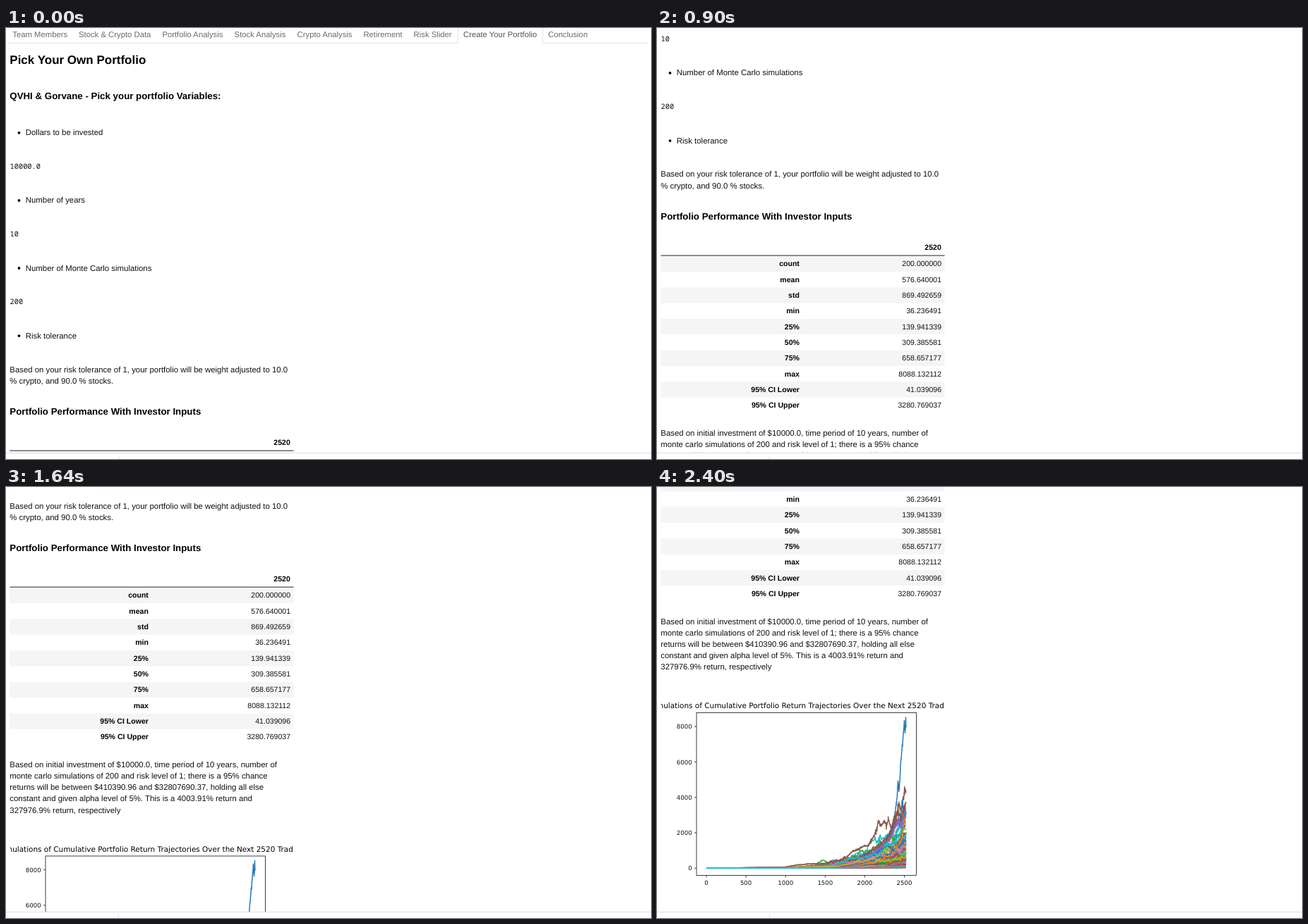
Write an HTML page that moves like this. It is 914 by 612 pixels and loops after 2.47 s.

```html
<!DOCTYPE html>
<html lang="en">
<head>
<meta charset="utf-8">
<title>Pick Your Own Portfolio</title>
<style>
  html, body { margin: 0; width: 100%; height: 100%; overflow: hidden; background: #fff; }
  svg { display: block; width: 914px; height: 612px; }
  text { font-family: "Liberation Sans", Arial, sans-serif; text-rendering: geometricPrecision; white-space: pre; }
  .tab { font-size: 11.3px; fill: #6a6a6a; }
  .active { fill: #555; }
  .h2 { font-size: 17px; font-weight: bold; }
  .h3 { font-size: 13.3px; font-weight: bold; }
  .body { font-size: 11.4px; fill: #111; }
  .mono { font: 10.3px "Noto Sans Mono", monospace; fill: #111; }
  .cell { font-size: 10.55px; text-anchor: end; fill: #111; }
  .head { font-size: 10.55px; font-weight: bold; text-anchor: end; }
  .title { font: 10.46px "DejaVu Sans", sans-serif; }
  .tick { font: 8.55px "DejaVu Sans", sans-serif; fill: #111; }
  .mid { text-anchor: middle; }
  .end { text-anchor: end; }
</style>
</head>
<body>
<svg viewBox="0 0 914 612">
  <defs>
    <clipPath id="pane"><rect width="914" height="603"/></clipPath>
    <clipPath id="column"><rect x="5.4" y="940" width="402.2" height="320"/></clipPath>
  </defs>
  <g clip-path="url(#pane)"><g id="page"></g></g>
  <path d="M0 603.5H914M159.5 607V612" stroke="#dedede" fill="none"/>
</svg>
<script>
const NS = "http://www.w3.org/2000/svg";
const page = document.getElementById("page");

function add(parent, tag, attrs, content) {
  const el = document.createElementNS(NS, tag);
  for (const k in attrs) el.setAttribute(k, attrs[k]);
  if (content !== undefined) el.textContent = content;
  parent.appendChild(el);
  return el;
}
const text = (cls, x, y, s, parent = page) => add(parent, "text", { class: cls, x, y }, s);

// Tab bar
const tabs = [
  ["Team Members", 9.3], ["Stock & Crypto Data", 103], ["Portfolio Analysis", 221.4],
  ["Stock Analysis", 323.6], ["Crypto Analysis", 412.6], ["Retirement", 506.4],
  ["Risk Slider", 577.6], ["Create Your Portfolio", 648], ["Conclusion", 768.3]
];
add(page, "path", { d: "M2 21.5H640.5V0M760.5 0V21.5H910", stroke: "#e2e2e2", fill: "none" });
tabs.forEach(([s, x], i) => text(i === 7 ? "tab active" : "tab", x, 13.4, s));

// Headings and inputs
const LEFT = 5.3;
text("h2", LEFT, 51, "Pick Your Own Portfolio");
text("h3", LEFT, 101.4, "QVHI & Gorvane - Pick your portfolio Variables:");

const inputs = [
  ["Dollars to be invested", "10000.0"], ["Number of years", "10"],
  ["Number of Monte Carlo simulations", "200"], ["Risk tolerance", ""]
];
inputs.forEach(([label, value], i) => {
  const y = 152.3 + i * 96.1;
  add(page, "circle", { cx: 18.5, cy: y - 3.5, r: 1.9 });
  text("body", 27.8, y, label);
  text("mono", LEFT + 0.3, y + 47.8, value);
});

function paragraph(y, lines) {
  lines.forEach((s, i) => text("body", LEFT, y + i * 16.1, s));
}
paragraph(488.5, [
  "Based on your risk tolerance of 1, your portfolio will be weight adjusted to 10.0",
  "% crypto, and 90.0 % stocks."
]);
text("h3", LEFT, 549.2, "Portfolio Performance With Investor Inputs");

// Summary table
const rows = [
  ["count", "200.000000"], ["mean", "576.640001"], ["std", "869.492659"], ["min", "36.236491"],
  ["25%", "139.941339"], ["50%", "309.385581"], ["75%", "658.657177"], ["max", "8088.132112"],
  ["95% CI Lower", "41.039096"], ["95% CI Upper", "3280.769037"]
];
const ROW = 22.34;
text("head", 402.8, 591.9, "2520");
rows.forEach(([name, value], i) => {
  const y = 600.7 + i * ROW;
  if (i % 2 === 0) add(page, "rect", { x: 5.4, y, width: 402.2, height: ROW, fill: "#f5f5f5" });
  text("head", 201.9, y + 14.7, name);
  text("cell", 403.1, y + 14.7, value);
});
add(page, "rect", { x: 5.4, y: 599.6, width: 402.2, height: 1, fill: "#222" });

paragraph(856.1, [
  "Based on initial investment of $10000.0, time period of 10 years, number of",
  "monte carlo simulations of 200 and risk level of 1; there is a 95% chance",
  "returns will be between $410390.96 and $32807690.37, holding all else",
  "constant and given alpha level of 5%. This is a 4003.91% return and",
  "327976.9% return, respectively"
]);

// Chart
const chart = add(page, "g", { "clip-path": "url(#column)" });
const X0 = 70, Y0 = 1202.8, DAY = 0.1122, UNIT = 50.3 / 2000;
text("title", -10.6, 975.8, "Simulations of Cumulative Portfolio Return Trajectories Over the Next 2520 Trad", chart);

let seed = 20;
function rand() {
  seed = (seed * 1664525 + 1013904223) % 4294967296;
  return (seed + 0.5) / 4294967296;
}
const gauss = () => Math.sqrt(-2 * Math.log(rand())) * Math.cos(2 * Math.PI * rand());

const colors = ["#1f77b4", "#ff7f0e", "#2ca02c", "#d62728", "#9467bd",
  "#8c564b", "#e377c2", "#7f7f7f", "#bcbd22", "#17becf"];
function curve(points, color) {
  const d = "M" + points.map(([x, y]) => x.toFixed(1) + " " + y.toFixed(1)).join("L");
  add(chart, "path", { d, stroke: color, fill: "none", "stroke-width": 1.45, "stroke-linejoin": "round" });
}

// Geometric random walk from 1 to a lognormal final value, drawn coarsely while flat
function walk() {
  const n = 420, w = [0], out = [];
  for (let k = 1; k <= n; k++) w.push(w[k - 1] + gauss() / Math.sqrt(n));
  const end = Math.min(5.73 + 1.2 * gauss(), 8.05);
  for (let k = 0; k <= n; k += k < n / 2 ? 6 : 1) {
    const t = k / n, log = end * t + 1.2 * (w[k] - w[n] * t);
    out.push([X0 + 2520 * DAY * t, Y0 - Math.exp(log) * UNIT]);
  }
  return out;
}

// Line through [x, height] knots with jitter that grows with height
function jagged(knots, amount, scale = 1) {
  const out = [];
  for (let i = 1; i < knots.length; i++) {
    const [xa, ha] = knots[i - 1], [xb, hb] = knots[i];
    const n = Math.max(2, Math.round((xb - xa) / 0.3));
    for (let k = 0; k < n; k++) {
      const t = k / n, h = scale * (ha + (hb - ha) * t);
      out.push([xa + (xb - xa) * t, Y0 - h * (1 + amount * gauss())]);
    }
  }
  const [x, h] = knots[knots.length - 1];
  out.push([x, Y0 - h * scale]);
  return out;
}
const blue = [[70, 0], [200, 1], [260, 6], [300, 18], [318, 28], [330, 42], [335, 62], [338, 84],
  [340, 101], [341.5, 123], [343, 109], [345, 142], [347, 168], [348, 177], [349.5, 197],
  [350.5, 207], [351.5, 189], [352.5, 210], [353, 200]];
const brown = [[70, 0], [180, 1.5], [195, 4], [215, 6], [240, 7], [258, 11], [268, 15], [277, 24],
  [286, 27], [293, 32], [300, 33], [305, 41], [311, 54], [314, 65], [318, 60], [322, 67],
  [325, 61], [328, 69], [332, 58], [336, 71], [340, 79], [343, 91], [346, 82], [349, 101],
  [351, 109], [353, 109]];
const late = [[70, 0], [200, 2], [250, 5], [280, 12], [300, 21], [315, 33], [330, 47], [337, 66],
  [342, 80], [346, 70], [350, 84], [353, 93]];

for (let i = 0; i < 200; i++) {
  const color = colors[i % 10];
  if (i === 110) curve(jagged(blue, 0.018), color);
  else if (i === 145) curve(jagged(brown, 0.03), color);
  else if (i === 164) curve(jagged(late, 0.04, 0.85), color);
  else if (i === 165) curve(jagged(late, 0.04), color);
  else curve(walk(), color);
}

const frame = { fill: "none", stroke: "#111", "stroke-width": 0.8 };
add(chart, "rect", { x: 56, y: 982, width: 311.5, height: 231, ...frame });
for (let i = 0; i <= 4; i++) {
  const y = Y0 - i * 50.3;
  add(chart, "path", { d: `M53 ${y}H56`, ...frame });
  text("tick end", 49.6, y + 3.1, i * 2000, chart);
}
for (let i = 0; i <= 5; i++) {
  const x = X0 + i * 500 * DAY;
  add(chart, "path", { d: `M${x} 1213V1216`, ...frame });
  text("tick mid", x, 1226.3, i * 500, chart);
}

// Scrolling: 36 steps per loop, a few of them 10 ms shorter
const LOOP = 2470, short = [5, 7, 12, 19, 34];
const starts = [0];
for (let i = 0; i < 35; i++) starts.push(starts[i] + (short.includes(i) ? 60 : 70));
const stops = [[0, 0], [5, 128.6], [9, 213.1], [16, 325], [21, 414.5], [28, 516], [35, 661.5]];

function scrollAt(step) {
  let i = 1;
  while (i < stops.length - 1 && step > stops[i][0]) i++;
  const [a, ya] = stops[i - 1], [b, yb] = stops[i];
  return ya + (yb - ya) * (step - a) / (b - a);
}

let last = -1;
function draw(ms) {
  const t = ms % LOOP;
  let step = 35;
  while (starts[step] > t) step--;
  if (step === last) return;
  last = step;
  page.setAttribute("transform", `translate(0 ${-scrollAt(step).toFixed(2)})`);
}

const begin = performance.now();
function tick() {
  draw(performance.now() - begin);
  requestAnimationFrame(tick);
}
tick();
</script>
</body>
</html>
```
